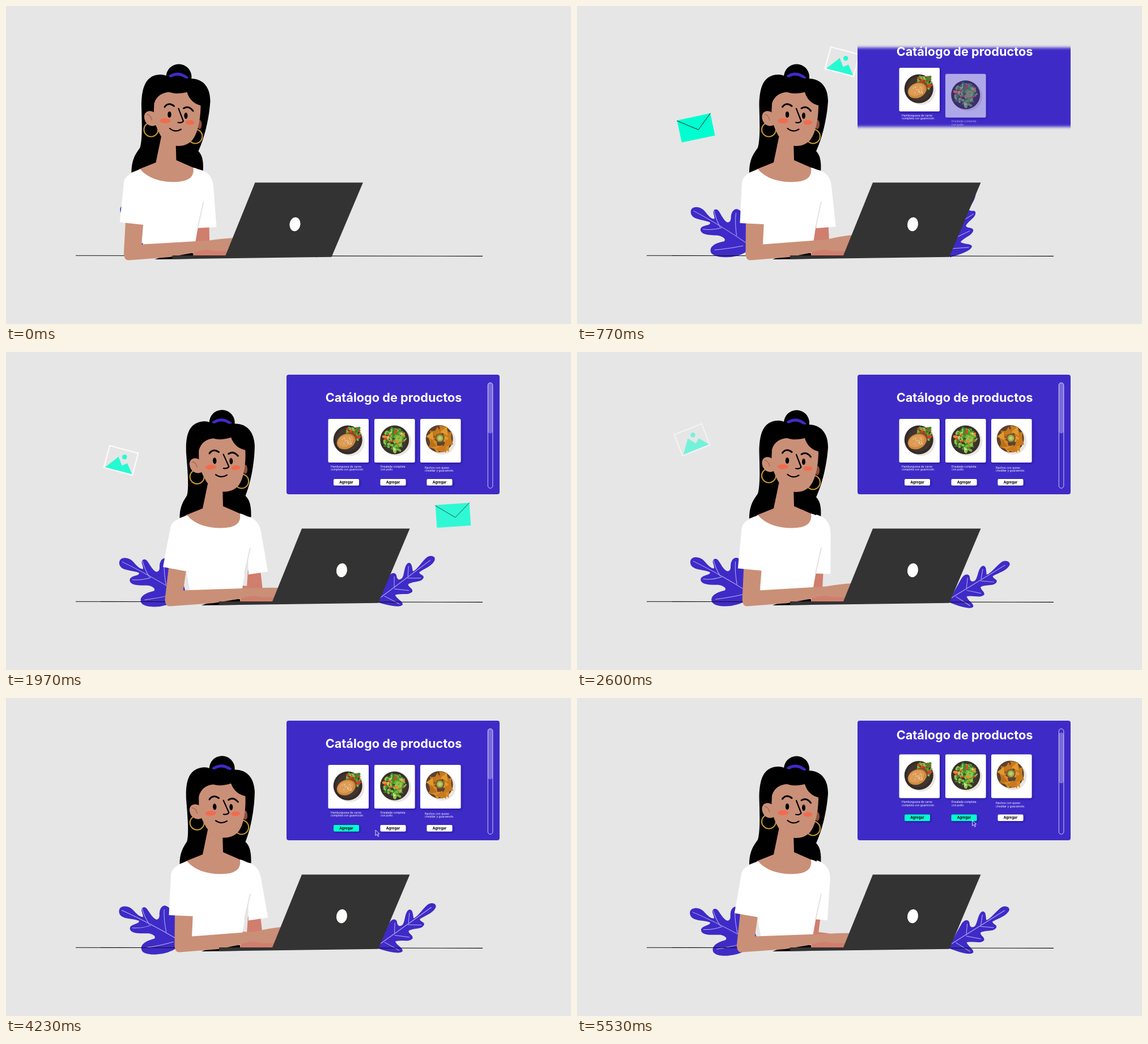
Animation of 997 by 561 pixels, one loop 5.56 s. Source, as an HTML page:

```html
<!DOCTYPE html>
<html lang="es">
<head>
<meta charset="utf-8">
<style>
html, body { margin: 0; height: 100%; overflow: hidden; background: #e6e6e6; }
svg { display: block; width: 997px; height: 561px; }
text { font-family: Inter, "Open Sans", sans-serif; }
.line { fill: none; stroke: #000; stroke-linecap: round; stroke-linejoin: round; }
.leaf { fill: #3e2bc7; stroke: #3e2bc7; stroke-width: 2.4; stroke-linejoin: round; }
.vein { fill: none; stroke: #b9b1f2; stroke-width: 1; }
.skin { fill: #ca8f77; }
.far { fill: #d07e6d; }
.violet { fill: #3e2bc7; }
.ring { fill: none; stroke: #c9982f; stroke-width: 2.1; }
</style>
</head>
<body>
<svg viewBox="0 0 997 561">
<defs>
  <filter id="soft" x="-10%" y="-20%" width="120%" height="140%"><feGaussianBlur stdDeviation="0 2.5"/></filter>
  <filter id="shade" x="-20%" y="-20%" width="150%" height="150%">
    <feDropShadow dx="2" dy="2" stdDeviation="2" flood-color="#1a0c80" flood-opacity=".45"/>
  </filter>
  <mask id="reveal" maskUnits="userSpaceOnUse" x="480" y="20" width="410" height="250">
    <rect id="slot" x="440" width="490" fill="#fff" filter="url(#soft)"/>
  </mask>
  <g id="mail">
    <rect x="-30" y="-20" width="60" height="40" fill="#00ffd0"/>
    <path class="line" d="M-30 -19L3.5 4L30 -20" stroke-width=".8"/>
  </g>
  <g id="photo">
    <rect x="-26" y="-20" width="52" height="40" fill="none" stroke="#fff" stroke-width="2.4"/>
    <path d="M-24 19L-6 -5L4 8.5L12 2L25 18.500Z" fill="#00ffd0"/>
    <circle cx="4.500" cy="-7.300" r="4.300" fill="#00ffd0"/>
  </g>
</defs>

<g id="leafL">
  <path class="leaf" d="M302 440C280 456 245 455 241 446C237 436 250 430 262 427C268 423 262 416 250 415C232 416 219 415 220 407C221 400 238 402 236 394C228 388 201 393 200.500 378C200 368 215 368 223 376C230 384 238 391 243 388C244 382 237 375 242 372C248 369 251 382 260 390C266 396 272 392 272 384C271 375 275 368 281 368.500C289 370 288 378 304 385L318 430Z"/>
  <path class="vein" d="M204 376Q250 396 302 426M240 373Q244 387 253 401M223 407Q240 408 256 402M279 374Q278 390 283 414M246 442Q272 438 296 431"/>
</g>
<g id="leafR">
  <path class="leaf" d="M658 441C664 425 672 410 677 400C682 390 690 390 690 398C691 404 696 406 701 402C707 396 705 381 712 376C718 373 718 384 719 390C724 394 734 378 744 369C751 362 762 365 758 372C752 382 738 385 730 391C730 398 740 397 737 402C733 409 718 405 710 411C708 418 719 420 716.500 425C711 431 696 425 686 429C686 437 700 442 698.500 447C694 452 676 447 658 441Z"/>
  <path class="vein" d="M660 434Q704 404 752 371M713 380L711 398M734 402L710 401M687 397L686 416M712 423L686 419M694 446L668 431"/>
</g>
<path d="M123 440.3L841 441.4" stroke="#111" stroke-width="1.1"/>

<g id="icons"></g>

<g id="panel" mask="url(#reveal)">
  <rect class="violet" x="495" y="40" width="376" height="211" rx="4"/>
  <text id="title" x="684" y="88" font-size="21.7" font-weight="700" fill="#fff" text-anchor="middle">Catálogo de productos</text>
  <g id="cards"></g>
  <g id="bar">
    <rect x="850.3" y="54.3" width="8.6" height="186" rx="4.3" fill="none" stroke="#fff" stroke-opacity=".75"/>
    <rect id="thumb" x="850" y="54" width="9" height="89.5" rx="4.5" fill="#fff" fill-opacity=".3"/>
  </g>
  <path id="cursor" class="violet" d="M0 0V9.6L2.4 7.4L4.4 11.2L6 10.4L4.2 6.8L7 6.3Z" stroke="#fff" stroke-width=".8"/>
</g>

<g id="scene">
  <g id="hair">
    <circle cx="387.500" cy="125" r="22.500"/>
    <path class="line" d="M371 125Q388 114 403 128" style="stroke:#3e2bc7;stroke-linecap:butt" stroke-width="5"/>
    <path d="M304 294C304 270 312 260 319 250C324 235 322 195 321.5 175C322 145 328 121 356 121C364 121 368 126 378 126C390 126 398 128 408 128C432 128 443 145 443 168C441 200 432 235 422 256C431 265 431 280 430 294Z"/>
  </g>
  <path class="skin" d="M357 228L347 276L317 288Q340 312 378 312Q417 312 415 286L383 272L382 236Z"/>
  <g id="head">
    <ellipse cx="424" cy="209" rx="4" ry="8" fill="#8f4f3d"/>
    <circle class="ring" cx="338.500" cy="218" r="12.500"/>
    <circle class="ring" cx="416.500" cy="230" r="12.500"/>
    <path class="skin" d="M344 188C336 182 326 186 326.500 196C327 208 338 215 347 210Z"/>
    <path class="skin" d="M344 172C348 158 360 152 371 152C382 156 394 154 402 152C406 166 416 173 426 175.500C426 200 421 225 411 237C403 246 390 248 381 246.500C368 243 359 235 355 228C348 215 345 205 343 195Z"/>
    <path d="M331 191Q338 192 340 202" fill="none" stroke="#9c604c" stroke-width="1.2"/>
    <ellipse cx="363.500" cy="202.500" rx="9.500" ry="4.200" fill="#f26b4e"/>
    <ellipse cx="407.500" cy="205.500" rx="8" ry="4" fill="#f26b4e"/>
    <ellipse cx="371" cy="191.500" rx="3.200" ry="5.600"/>
    <ellipse cx="400" cy="193.500" rx="3" ry="5.500"/>
    <path class="line" stroke-width="3" d="M362.500 178Q369 169 379 176.500M396 180.500Q405 175 412.500 185"/>
    <path class="line" stroke-width="2.200" d="M387 181L395.500 203Q393 207 386 205.500M371.500 216Q381 224 391.500 217.500"/>
  </g>
  <path d="M345 447L376 436H413V446Z"/>
  <path class="far" d="M418 412L443 415L474 426V440H413Z"/>
  <g id="sleeveR">
    <path class="far" d="M421 385H443L445 432L414 436Z"/>
    <path d="M420 288C440 291 447 303 449 318L456 389.500L421.500 392L424 345Z" fill="#fff"/>
  </g>
  <path d="M319 288Q340 310.500 378 310.500Q417 311 413 285Q432 290 438 302L431 345L421 392L414 432L325 424L318 385L306 330L304 294Z" fill="#fff"/>
  <path d="M431 345L421 391" stroke="#dedede" stroke-width="1.600"/>
  <path id="arm" class="skin"/>
  <path id="sleeveL" d="M319 288C300 295 292 302 291 312L287.500 383L330 385L340 310Z" fill="#fff"/>
  <path d="M376 440L470 440L522 311.500H712.500L657 442.700L376 446.500Z" fill="#333"/>
  <ellipse cx="592.500" cy="385" rx="9.500" ry="12.300" transform="rotate(8 592.5 385)" fill="#fdfdfb"/>
</g>
</svg>

<script>
const LOOP = 5560, { PI, cos, sin, min, max } = Math;
const $ = id => document.getElementById(id);
const clamp = (v, a = 0, b = 1) => min(b, max(a, v));
const span = (t, a, b) => clamp((t - a) / (b - a));
const smooth = k => k * k * (3 - 2 * k);
const mix = (a, b, k) => a + (b - a) * k;
const set = (el, name, value) => el.setAttribute(name, value);
const spin = (el, deg, x, y, dx = 0) => set(el, 'transform', `translate(${dx} 0) rotate(${deg} ${x} ${y})`);

let seed = 7;
const rnd = () => (seed = seed * 16807 % 2147483647) / 2147483647;
const pick = list => list[Math.floor(rnd() * list.length)];
const repeat = (n, f) => Array.from({ length: n }, (_, i) => f(i)).join('');

// Small dishes, drawn around their own centre
const blob = (x, y, rx, ry, deg, fill) =>
  `<ellipse rx="${rx}" ry="${ry}" fill="${fill}" transform="translate(${x} ${y}) rotate(${deg})"/>`;
const plate = fill => blob(4, 3, 25.5, 25.5, 0, '#e9e5e2') + blob(0, 0, 25.5, 25.5, 0, fill) + blob(0, 0, 21, 21, 0, '#40352f');
const greens = ['#4c9a2a', '#6fb936', '#3d8a2c', '#8ac64a'];
const scatter = (n, cx, cy, r, colors) => repeat(n, () => {
  const a = rnd() * 2 * PI, d = r * Math.sqrt(rnd());
  return blob(cx + d * cos(a), cy + d * sin(a), 2 + rnd() * 3, 1.3 + rnd() * 1.5, rnd() * 180, pick(colors));
});
const burger = () => plate('#352b27')
  + scatter(45, 9, -11, 13, [...greens, '#e03a2a', '#e03a2a'])
  + blob(0, 0, 17, 12, -28, '#8a4a22')
  + blob(-3, 3, 17, 13, -24, '#cf8a42') + blob(-4, 2, 14, 10, -24, '#dc9c56')
  + repeat(18, () => blob(-14 + rnd() * 21, -4 + rnd() * 12, .9, .6, 30, '#f8e6b8'));
const salad = () => plate('#3a302b')
  + scatter(120, 0, 0, 19.500, [...greens, ...greens, '#e2462f', '#f08a2c', '#b5d873', '#d9e8a0']);
const nachos = () => blob(4, 4, 24, 24, 0, '#e9e5e2') + blob(-1, 0, 24, 24, 0, '#5d4032')
  + repeat(20, i => {
    const d = 12 + rnd() * 8;
    return `<path d="M-7 -6L8 -3L-3 8Z" fill="${pick(['#d98a22', '#e09a2c', '#c97a1c', '#b96f1c'])}" transform="rotate(${i * 54}) translate(${d} 0) rotate(${rnd() * 120})"/>`;
  })
  + blob(0, -1, 8, 8, 0, '#7a5230') + blob(0, -1, 6, 6, 0, '#9bb04a') + blob(0, -1, 3, 3, 0, '#c2cf78');

const dishes = [
  [568.5, 573, 203.5, 578, burger, -1, 0, 'Hamburguesa de carne', 'completa con guarnición.'],
  [650, 661, 203.5, 660.5, salad, 0, 0, 'Ensalada completa', 'con pollo.'],
  [731, 739, 205.5, 742.5, nachos, -1, -2, 'Nachos con queso', 'cheddar y guacamole.']
];
$('cards').innerHTML = dishes.map(([x, tx, ty, bx, food, fx, fy, a, b]) => `
  <g class="card">
    <rect x="${x}" y="118" width="71.500" height="77" rx="2.500" fill="#fff" filter="url(#shade)"/>
    <g transform="translate(${x + 35.7 + fx} ${155 + fy})">${food()}</g>
    <text font-size="4.900" fill="#fff" x="${tx}" y="${ty}">${a}<tspan x="${tx}" dy="5.500">${b}</tspan></text>
  </g>
  <g class="button">
    <rect x="${bx}" y="224" width="45" height="11.500" rx="2" filter="url(#shade)"/>
    <text x="${bx + 22.5}" y="231.800" font-size="6.200" font-weight="700" text-anchor="middle">Agregar</text>
  </g>`).join('');
const cards = document.querySelectorAll('.card');
const buttons = document.querySelectorAll('.button');

const icons = [
  { kind: 'mail', start: 450, x: 210, y: 252 },
  { kind: 'photo', start: 600, x: 468, y: 108 },
  { kind: 'mail', start: 1380, x: 789, y: 356 },
  { kind: 'photo', start: 1800, x: 203, y: 201 }
];
$('icons').innerHTML = icons.map(i => `<use href="#${i.kind}"/>`).join('');

function drawIcons(t) {
  icons.forEach((icon, i) => {
    const el = $('icons').children[i], age = t - icon.start, mail = icon.kind === 'mail';
    const rise = age * (mail ? .115 : .0576);
    const turn = mail ? -21.6 + age * .03 : 24.8 - age * .0576;
    set(el, 'opacity', clamp(min(age / 205, ((mail ? 750 : 900) - age) / 200)));
    set(el, 'transform', `translate(${icon.x} ${icon.y - rise}) rotate(${turn})`);
  });
}

// Rises from below, overshoots, then settles
function hop(age) {
  const up = span(age, 0, 270);
  return age < 270 ? 20 - 29 * up * (2 - up) : -9 * (1 - span(age, 270, 450));
}

function drawPanel(t) {
  const half = 120 * span(t, 570, 915), scroll = 18.5 * smooth(span(t, 5180, 5530));
  set($('slot'), 'y', 143.3 - half);
  set($('slot'), 'height', 2 * half);
  set($('title'), 'transform', `translate(0 ${-scroll * .82})`);
  set($('bar'), 'opacity', span(t, 770, 930));
  set($('thumb'), 'transform', `translate(0 ${scroll * .38})`);
  cards.forEach((card, i) => {
    const age = t - 500 - 165 * i;
    [[card, age, 1], [buttons[i], age - 90, .7]].forEach(([el, a, height]) => {
      set(el, 'transform', `translate(0 ${hop(a) * height - scroll})`);
      set(el, 'opacity', clamp(a / 180));
    });
    const chosen = t > [3250, 4750, Infinity][i];
    set(buttons[i].firstElementChild, 'fill', chosen ? '#00ffcc' : '#fff');
  });
  const enter = smooth(span(t, 2700, 3180)), move = smooth(span(t, 3950, 4570));
  const x = mix(640, 617.500, enter) + 80 * move, y = mix(244, 232, enter) + 2.5 * move - scroll;
  set($('cursor'), 'transform', `translate(${x} ${y})`);
  set($('cursor'), 'opacity', span(t, 2700, 2850));
}

// Typing rhythm of the near arm: time and number of half swings
const beats = [[0, .44], [770, 4], [1100, 5.47], [1970, 9], [3330, 14.61], [4230, 18], [5560, 23.3]];
function swing(t) {
  const i = beats.findIndex(b => b[0] > t), [a, p] = beats[i - 1], [b, q] = beats[i];
  return cos(PI * mix(p, q, (t - a) / (b - a)));
}

function drawWoman(t, slide) {
  set($('scene'), 'transform', `translate(${slide} 0)`);
  const tilt = -1.5 + 1.5 * clamp(3 * cos(PI * (t - 300) / 1300), -1, 1);
  spin($('hair'), tilt, 378, 245);
  spin($('head'), tilt, 378, 245);

  const reach = -4 + 10 * cos(2 * PI * (t - 4230) / 377);
  spin($('sleeveR'), -.7 * reach, 432, 305);

  const d = -8.5 + 8.5 * swing(t);
  spin($('sleeveL'), -.46 * d, 310, 305);
  set($('arm'), 'd', `M${298 + .6 * d} 374L${297.5 + d} 436Q${298 + d} 449 ${306 + d} 448.500
    L${375 + .5 * d} 443L412 435.500Q430 429 442 430.500Q455 434 475 432L486 ${404 - .7 * d}
    Q465 ${406 - .55 * d} 440 ${412 - .25 * d}L${328 + .9 * d} 420.500L${330 + .65 * d} 378Z`);
}

function drawLeaves(t, slide) {
  const spring = cos(2 * PI * t / 770) * max(0, 1 - (t / 1050) ** 4);
  spin($('leafL'), .8 + 1.3 * cos(PI * (t - 2650) / 2700) + 6 * spring, 400, 390);
  spin($('leafR'), 1.5 - 4.7 * cos(PI * (t - 1700) / 1500) - 53 * spring, 660, 440, slide * 1.35);
}

function frame() {
  const t = performance.now() % LOOP;
  const slide = -83 * (1 - span(t, 0, 550)) ** 3;
  drawLeaves(t, slide);
  drawIcons(t);
  drawPanel(t);
  drawWoman(t, slide);
  requestAnimationFrame(frame);
}
frame();
</script>
</body>
</html>
```
